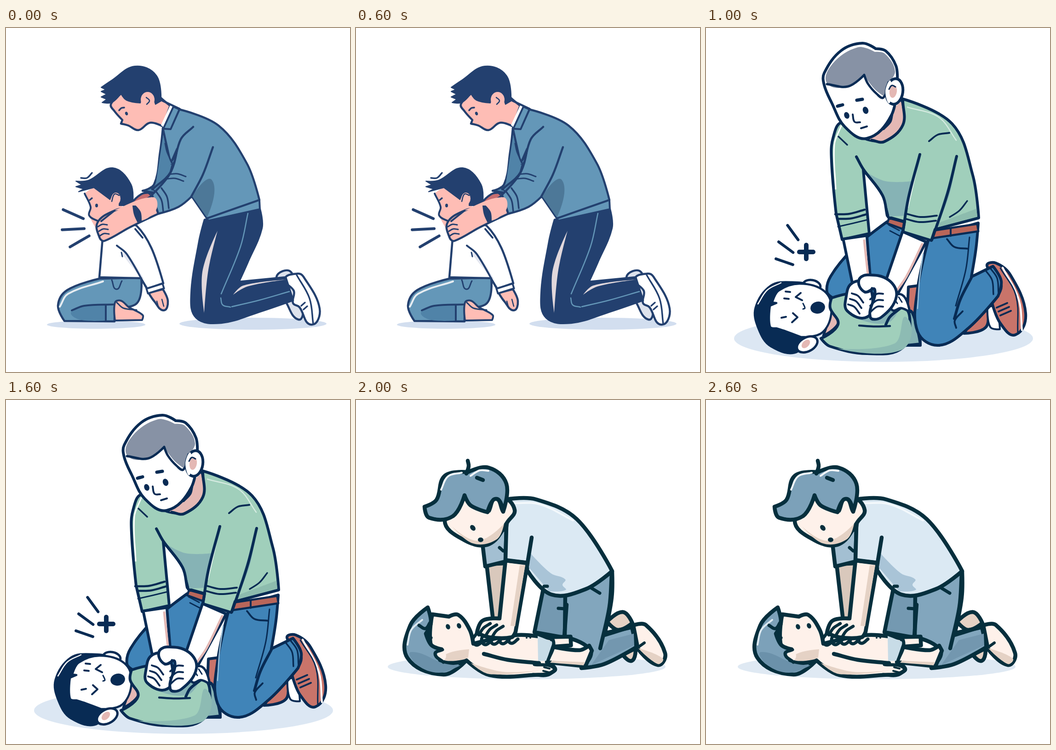
Recreate the animation shown at these times as an HTML page. Size 748 by 748 pixels, loop 3000 ms.

```html
<!DOCTYPE html>
<html lang="en">
<head>
<meta charset="utf-8">
<title>First aid steps</title>
<style>
html, body { margin: 0; width: 100%; height: 100%; overflow: hidden; background: #fff; }
svg { display: block; width: 100vw; height: 100vh; }
</style>
</head>
<body>
<svg id="stage" viewBox="0 0 748 748"></svg>
<script>
const NS = "http://www.w3.org/2000/svg";
const stage = document.getElementById("stage");
const STEP = 1000;

function add(parent, tag, attrs) {
  const el = document.createElementNS(NS, tag);
  for (const k in attrs) el.setAttribute(k, attrs[k]);
  return parent.appendChild(el);
}

// Smooth curve through a few "x,y" points; a trailing "!" makes a sharp corner.
function curve(text, closed) {
  const pts = text.trim().split(/\s+/).map(s => {
    const [x, y] = s.replace("!", "").split(",").map(Number);
    return { x, y, sharp: s.endsWith("!") };
  });
  const n = pts.length;
  const at = i => closed ? pts[(i + n) % n] : pts[Math.max(0, Math.min(n - 1, i))];
  const handle = (i, len, sign) => {
    const p = at(i), a = at(i - 1), b = at(i + 1);
    const span = Math.hypot(b.x - a.x, b.y - a.y);
    const k = p.sharp || !span ? 0 : sign * len / 2.8 / span;
    return (p.x + (b.x - a.x) * k).toFixed(1) + " " + (p.y + (b.y - a.y) * k).toFixed(1);
  };
  let d = `M${pts[0].x} ${pts[0].y}`;
  for (let i = 0; i < (closed ? n : n - 1); i++) {
    const p = at(i), q = at(i + 1), len = Math.hypot(q.x - p.x, q.y - p.y);
    d += `C${handle(i, len, 1)} ${handle(i + 1, len, -1)} ${q.x} ${q.y}`;
  }
  return closed ? d + "Z" : d;
}

function scene(ink, width) {
  const g = add(stage, "g", { "stroke-linecap": "round", "stroke-linejoin": "round", visibility: "hidden" });
  const pen = {
    g,
    fill: (color, pts) => add(g, "path", { d: curve(pts, true), fill: color }),
    shape: (color, pts, w = width) =>
      add(g, "path", { d: curve(pts, true), fill: color, stroke: ink, "stroke-width": w }),
    line: (pts, w = width, color = ink) =>
      add(g, "path", { d: curve(pts), fill: "none", stroke: color, "stroke-width": w }),
    oval: (color, cx, cy, rx, ry, turn = 0, w = 0) =>
      add(g, "ellipse", { cx, cy, rx, ry, fill: color, stroke: ink, "stroke-width": w, transform: `rotate(${turn} ${cx} ${cy})` }),
    // The same stroke n times, each shifted by (dx, dy).
    row(n, dx, dy, pts, w = width) {
      for (let i = 0; i < n; i++) pen.line(pts, w).setAttribute("transform", `translate(${i * dx} ${i * dy})`);
    },
    // Straight tapered piece between two points, wa and wb wide.
    limb(color, ax, ay, bx, by, wa, wb, w = width) {
      const len = Math.hypot(bx - ax, by - ay), nx = (ay - by) / len / 2, ny = (bx - ax) / len / 2;
      const corner = (x, y, k) => `${x + nx * k},${y + ny * k}!`;
      return pen.shape(color, [corner(ax, ay, wa), corner(bx, by, wb), corner(bx, by, -wb), corner(ax, ay, -wa)].join(" "), w);
    },
    // Three strokes that point away from (cx, cy).
    burst(cx, cy, angle, turn, inner, grow, len, w) {
      for (let i = 0; i < 3; i++) {
        const a = (angle + turn * i) * Math.PI / 180, r = inner + grow * i;
        const tip = q => `${cx + q * Math.cos(a)},${cy + q * Math.sin(a)}`;
        pen.line(tip(r) + " " + tip(r + len), w);
      }
    }
  };
  return pen;
}

function backBlows() {
  const ink = "#23406f", blue = "#6497b8", deep = "#5083a8", skin = "#febdb5", pale = "#e1d8dc";
  const { g, fill, shape, line, oval, row, limb, burst } = scene(ink, 4.5);
  oval("#d2deef", 196, 645, 107, 9);
  oval("#d2deef", 537, 643, 160, 13);

  // shoes and trousers
  shape("#dde2ec", "588,542 620,531 646,612 636,634 612,602");
  shape("#fff", "606,546 634,534 647,541 682,610 664,645 638,607 624,598 626,572");
  line("632,537 660,588 668,643", 3.5);
  row(2, 5, 8, "642,604 650,597", 3.5);
  shape(ink, "432,417! 552,394! 556,435 525,510 506,552! 608,542! 624,592! 545,619 468,641 414,630 403,580 420,465");
  fill(pale, "460,441! 440,526 431,620! 427,530");
  fill(pale, "494,580! 516,560 609,547! 525,562");
  line("526,403 510,475 468,578", 2.5, blue);
  line("467,587 471,602 488,607", 2.5, blue);
  line("491,606 550,592 616,573", 2.5, blue);

  // far arm
  shape(deep, "341,218! 335,270 322,340 297,354! 345,362! 380,230!");
  shape("#c76d70", "266,389! 297,360 332,362! 322,376");
  row(2, 11, -7, "303,353 314,363", 3);

  // adult head
  shape(skin, "250,143! 228,166 236,181 253,200! 250,208! 266,212 288,222 313,206 341,214! 357,169! 340,155 290,110");
  fill("#fff", "357,168! 367,173! 347,220! 337,211!");
  shape(ink, "207,129! 229,114 280,83 327,103 337,159! 325,166! 307,140 292,163! 262,157 250,143! 230,162 209,162! 219,155! 207,150! 219,144! 207,138! 217,134!", 2);
  oval(skin, 308, 156, 15, 17);
  line("305,151 312,158 306,166", 2.5);
  oval(ink, 262, 186, 3, 4, -20);
  line("246,179 251,174 257,173", 3.5);

  // sweater
  shape(blue, "341,218! 358,218! 377,177! 462,212 524,295 551,374! 437,414! 404,366! 375,389 331,404! 317,363! 357,316 372,263! 358,295!");
  fill(deep, "342,232! 359,294 368,282! 325,345!");
  fill("#4d7898", "405,366! 448,331 437,412!");
  shape(blue, "437,414! 551,374! 552,394! 440,419!", 4);
  shape(blue, "364,171! 377,177! 358,220! 342,219!", 4);
  line("340,158 378,176");
  line("407,215 380,242 358,313 318,351");
  line("450,259 428,319 402,368");
  line("346,251 350,269 361,293", 3);
  row(2, -5, 10, "355,318 373,317 391,323", 3);
  row(2, -12, 7, "338,348 350,367 354,392", 3.5);

  // child
  fill(skin, "190,346! 170,360! 184,389 181,408 211,459! 272,432! 246,380");
  line("171,360 184,389 181,408 203,421", 4);
  shape(ink, "152,333! 180,331 232,304 272,340 275,387! 246,386! 239,358 226,373! 191,347! 158,356! 169,350! 152,345! 165,341!", 2);
  oval(skin, 239, 371, 10, 13);
  line("230,377 236,361 246,364", 2.5);
  line("163,326 176,326 187,315", 3.5);
  oval(ink, 197, 386, 3, 4);
  line("182,374 187,370", 3.5);
  shape(blue, "203,545! 133,570 113,603 127,637! 236,638! 236,607! 285,598 294,543!");
  line("117,606 135,578 211,551", 4, "#e7edf2");
  fill(deep, "142,617 180,602 218,602! 217,636! 160,634");
  line("143,614 170,604 236,601", 4);
  line("217,603 217,636", 4);
  shape(skin, "237,597 250,593 267,607 297,624 296,635! 237,636!", 4);
  line("241,597 255,609 284,613", 3);
  line("230,548 240,568 252,550", 3);
  shape("#fff", "210,458! 203,542! 293,544! 307,567! 342,555! 316,478 284,430 269,432");
  fill("#e4e7f0", "250,489! 292,542! 301,548! 264,491");
  line("241,473 263,492 308,570", 4);
  line("251,488 253,497", 3);
  line("281,437 297,456", 4);
  line("203,544 294,544", 4);
  shape(skin, "310,576! 341,568! 352,594 343,614 323,595");
  limb("#fff", 307, 572, 342, 561, 11, 11, 4);
  row(2, 11, -4, "328,594 332,609", 2.5);

  // near hand
  shape(skin, "318,364! 280,386 236,397 199,423 204,457 214,463 270,433 331,404!");
  fill(skin, "245,397 236,396 320,368 326,396 285,420");
  line("236,397 207,420", 4);
  row(3, 2, 10, "200,432 209,427 220,428", 3);
  fill(ink, "275,386! 282,386! 293,400 295,419! 286,423! 278,405");
  burst(212, 434, 150, 27, 36, 6, 48, 6);
  return g;
}

function compressions() {
  const ink = "#082b54", green = "#a0cfbb", jeans = "#4084b8", blush = "#e4b8b4", red = "#c9746a", shade = "#86b3b5";
  const { g, fill, shape, line, oval, row, limb, burst } = scene(ink, 6);
  oval("#dce7f3", 386, 675, 325, 51);

  // far leg and feet
  shape(jeans, "394,421! 318,482 271,540 263,574 278,588! 417,560 435,435!");
  row(2, 3, 13, "397,428 420,440", 3);
  shape(red, "440,563! 463,560! 466,690! 435,690!");
  shape(shade, "430,615! 448,618 466,687! 428,691!");
  shape(red, "610,606! 609,650 561,664! 590,619!");
  shape("#fff", "612,608! 629,606 639,655! 618,650", 4);

  // near leg
  shape(red, "611,517 630,511 662,537 695,620 673,667 640,642 622,598! 642,559");
  line("645,521 680,590 687,657", 4, "#fff");
  line("640,522 674,582 678,662", 3);
  row(3, 4, 8.5, "632,608 655,598", 4);
  shape(jeans, "485,455! 592,424! 587,480 577,541! 624,518! 642,550 635,583! 570,653 506,690 460,660 460,568");
  row(2, 11, -4, "607,526 622,548 625,579", 3.5);
  line("573,455 565,525 543,604", 3);
  line("577,543 553,590 540,632");
  line("558,616 541,636 544,652", 4);
  line("524,459 540,476 570,480", 4);
  line("472,492 464,550 460,610", 2.5, "#9cc2dc");

  // belt and torso
  limb("#b9665a", 396, 419, 430, 430, 12, 15, 4.5);
  limb("#b9665a", 492, 449, 591, 434, 16, 16, 4.5);
  line("532,437 532,452", 4);
  shape(green, "298,205 276,240 273,290 283,404! 296,460! 355,447! 342,309! 384,364 396,411! 432,421! 428,443! 490,462! 498,438! 593,413! 580,320 535,208 427,154! 400,235 350,242");
  fill(shade, "345,311! 390,333 449,333! 434,408! 399,410! 384,364");
  fill(shade, "542,295! 530,360 501,434! 512,390");
  fill("#8dbcae", "505,424! 588,393! 590,410! 500,434!");
  line("294,213 279,254 282,350", 3, "#fff");
  line("438,172 506,194 544,244", 2.5, "#d5ebe1");
  line("460,298 439,390", 3, "#e8f4ef");
  line("327,280 342,307 384,364 394,408");
  line("465,275 440,370 428,444");
  line("545,279 525,360 491,461");
  line("288,236 307,254", 3.5);
  line("485,246 504,232 529,228", 4);
  line("530,411 551,397 568,376", 3.5);
  row(2, 4, 10, "281,405 312,404 345,395", 4.5);
  line("287,432 318,425 351,417", 3);
  row(2, -2, 11, "436,404 466,411 502,408", 4);

  // head
  fill(blush, "402,180! 424,160! 424,220 376,248 356,243!");
  line("428,158 428,211 388,247 360,244");
  shape("#fff", "257,124 257,98 294,49 340,33 369,45! 391,50 413,82 416,114! 403,190 350,240 302,215 273,162");
  fill("#8792a5", "264,121 275,78 330,42 367,52! 389,56 411,94 395,121! 389,150! 366,132 344,103! 315,126");
  line("263,122 309,127 344,102! 352,121 371,143 386,151 397,118", 5);
  oval("#fff", 410, 138, 18, 28, 8, 6);
  fill("#fff", "390,138 402,116 400,162");
  oval(blush, 407, 138, 8, 14, 8);
  line("398,133 404,125 412,128", 3);
  line("404,189 400,204 386,219");
  oval(ink, 306, 190, 5.5, 7.5, -20);
  oval(ink, 347, 179, 6, 8, -20);
  line("286,170 297,167", 7);
  line("328,157 340,155", 7);
  line("319,188 323,204 335,205", 4);
  line("337,218 350,214", 4);

  // patient
  oval("#fff", 230, 560, 19, 12, 10, 5);
  shape(ink, "187,552 140,560 107,608 113,653 141,693 200,704 240,640 225,563", 3);
  line("113,600 133,570 163,554", 2.5, "#fff");
  shape(blush, "270,611 288,640 255,669! 263,646", 5);
  shape("#fff", "158,571 204,556 257,572 273,613 253,662 207,672! 175,660 153,653! 139,649 139,604! 153,598! 144,597!", 4.5);
  oval("#fff", 220, 688, 24, 15, -28, 5);
  oval(blush, 217, 687, 11, 7, -45);
  row(2, -3, 15, "173,573 183,574", 4);
  line("206,576 195,585! 209,592", 4);
  line("164,630 174,628", 4);
  line("189,620 199,629! 187,640", 4);
  line("211,599 215,609 211,611", 3);
  oval(ink, 243, 608, 16, 13, -12);
  shape(green, "273,587! 335,575 421,597 443,630 428,695 350,708 269,692 250,675! 287,645 270,609");
  fill(shade, "307,613! 404,606 420,612! 395,641 330,633");
  fill("#8dbbb3", "437,630 425,700 285,697! 410,686");
  line("333,647 364,649 400,648", 4.5);
  line("391,645 400,628 422,610");
  shape("#fff", "398,595 426,580 443,618! 424,609 406,614", 5);
  row(2, 10, -3, "409,588 416,599", 3);

  // forearms and clasped hands
  limb("#fff", 324, 455, 338, 552, 52, 40);
  line("344,462 352,535", 5, blush);
  limb("#fff", 453, 454, 402, 570, 56, 34);
  line("470,470 436,540 414,572", 5, blush);
  shape("#fff", "316,556 345,553 362,585 351,628 307,615 305,583");
  shape("#fff", "332,550 350,537 397,548 414,584 381,629 357,628 367,569 345,574");
  row(3, -4, 12, "317,577 330,582 342,597", 4);
  row(3, 0, 14, "357,590 372,578 385,578", 4);
  line("341,572 354,574 361,565", 4);
  burst(257, 538, 199, 17.4, 72, 12, 39, 6);
  row(1, 0, 0, "203,487 233,487", 10);
  row(1, 0, 0, "218,472 218,502", 10);
  return g;
}

function kneeling() {
  const ink = "#062f3d", hair = "#7ca1b9", shirt = "#dbe9f3", jeans = "#82a6bd", skin = "#fef1ea", tan = "#e5d2c5";
  const { g, fill, shape, line, oval, row, limb } = scene(ink, 8.5);
  oval("#dfe9f3", 371, 580, 302, 27);

  // legs and feet
  shape(tan, "546,482! 580,461 601,485! 570,500");
  shape(tan, "580,554! 600,567 608,540!");
  shape(skin, "603,490! 630,489 672,550 656,576 613,541!");
  fill(tan, "614,540! 667,562 656,574");
  line("613,538 627,528", 6);
  shape("#7499b1", "407,412! 388,505! 455,517! 466,426!");
  shape(jeans, "557,373! 556,430 541,507! 600,494! 610,537! 540,574 490,583! 510,545 454,515! 455,422!");
  fill("#7397af", "550,522! 604,508! 605,533! 511,577!");
  line("556,380 551,450 531,540");
  line("542,512 600,494", 6);
  line("458,445 453,514");
  line("440,453 455,454", 7);
  line("512,409 530,420", 7);

  // shirt and far arm
  limb("#d9c8bc", 305, 356, 311, 478, 42, 26);
  shape("#a3bfd2", "275,312! 281,362! 325,351! 327,278!");
  line("312,321 320,328", 7);
  shape(shirt, "327,277! 334,215! 391,216 480,259 557,372! 500,411 425,423 372,370! 373,354! 325,348!");
  fill("#a9c4d7", "380,334! 424,377 455,390 449,402 456,413 420,416! 375,363!");
  line("340,224 400,227 472,262", 4, "#f4f9fc");
  line("382,299 373,354");
  line("409,405 416,405", 7);

  // head
  shape(skin, "193,260 236,305 290,313 331,263 345,239 320,211 245,205");
  fill(tan, "209,275! 265,306 322,269! 306,303 255,312");
  shape(hair, "149,232! 175,217 193,165 243,157! 288,147 327,182 320,243! 305,215 286,244! 249,229 236,207! 210,253 159,256");
  line("185,195 200,166 230,158", 4, "#f3f8fb");
  line("249,165 269,153 288,154", 4, "#f3f8fb");
  oval(skin, 304, 234, 13, 17);
  line("289,241 304,215 319,241");
  line("243,132 245,144 240,160");
  line("263,169 276,174");
  oval(ink, 254, 278, 5, 7, -40);
  oval(ink, 271, 304, 6, 5);

  // patient
  limb(skin, 426, 526, 467, 524, 21, 19);
  shape(skin, "166,466! 202,471! 222,467 247,499 255,530! 352,511 427,519! 416,570! 432,588 385,598 290,598 240,566! 170,550");
  fill(tan, "190,556 246,542! 244,560! 205,572");
  fill(tan, "250,572! 320,591 399,588! 290,596");
  shape(skin, "425,536! 486,544 507,534! 513,545! 499,579! 415,570!");
  fill(tan, "426,567! 497,570! 495,577! 422,571!");
  fill("#c8dce7", "395,513! 428,526! 414,567! 396,568!");
  line("398,510 429,523 416,571", 7);
  line("278,552 330,565 398,572");
  line("388,575 430,582 417,598 385,597", 7);
  row(2, -2, 8, "409,581 421,584", 4);
  shape(hair, "156,451! 163,484 152,508! 164,533 186,542! 185,568 238,568! 190,597 112,561 118,490");
  fill("#6b91aa", "120,548 192,573 227,577! 180,593 133,576");
  line("112,532 120,500 144,478", 4, "#dce9f1");
  line("161,484 151,497 137,490", 7);
  line("153,507 163,517", 7);
  oval(skin, 186, 556, 10, 12);
  line("188,543 172,552 190,570", 7);
  oval(ink, 200, 493, 4.5, 6, -25);
  oval(ink, 224, 491, 4.5, 6, -25);
  oval(ink, 371, 517, 2, 2);
  oval(ink, 379, 517, 2, 2);

  // near arm and hands
  row(5, 19, -1, "262,508 254,522 262,533 276,524", 7);
  shape(skin, "325,349! 312,475! 275,480 263,506! 290,516 338,516 347,504! 373,355!");
  fill(tan, "356,359! 368,359! 346,492! 336,491!");
  line("325,349 373,354");
  row(3, 14, 3, "267,511 277,496 292,486", 6.5);
  return g;
}

const steps = [backBlows(), compressions(), kneeling()];
const start = performance.now();

function render(t) {
  const now = Math.floor(t / STEP) % steps.length;
  steps.forEach((g, i) => g.setAttribute("visibility", i === now ? "visible" : "hidden"));
}

function tick() {
  render(performance.now() - start);
  requestAnimationFrame(tick);
}
tick();
</script>
</body>
</html>
```
